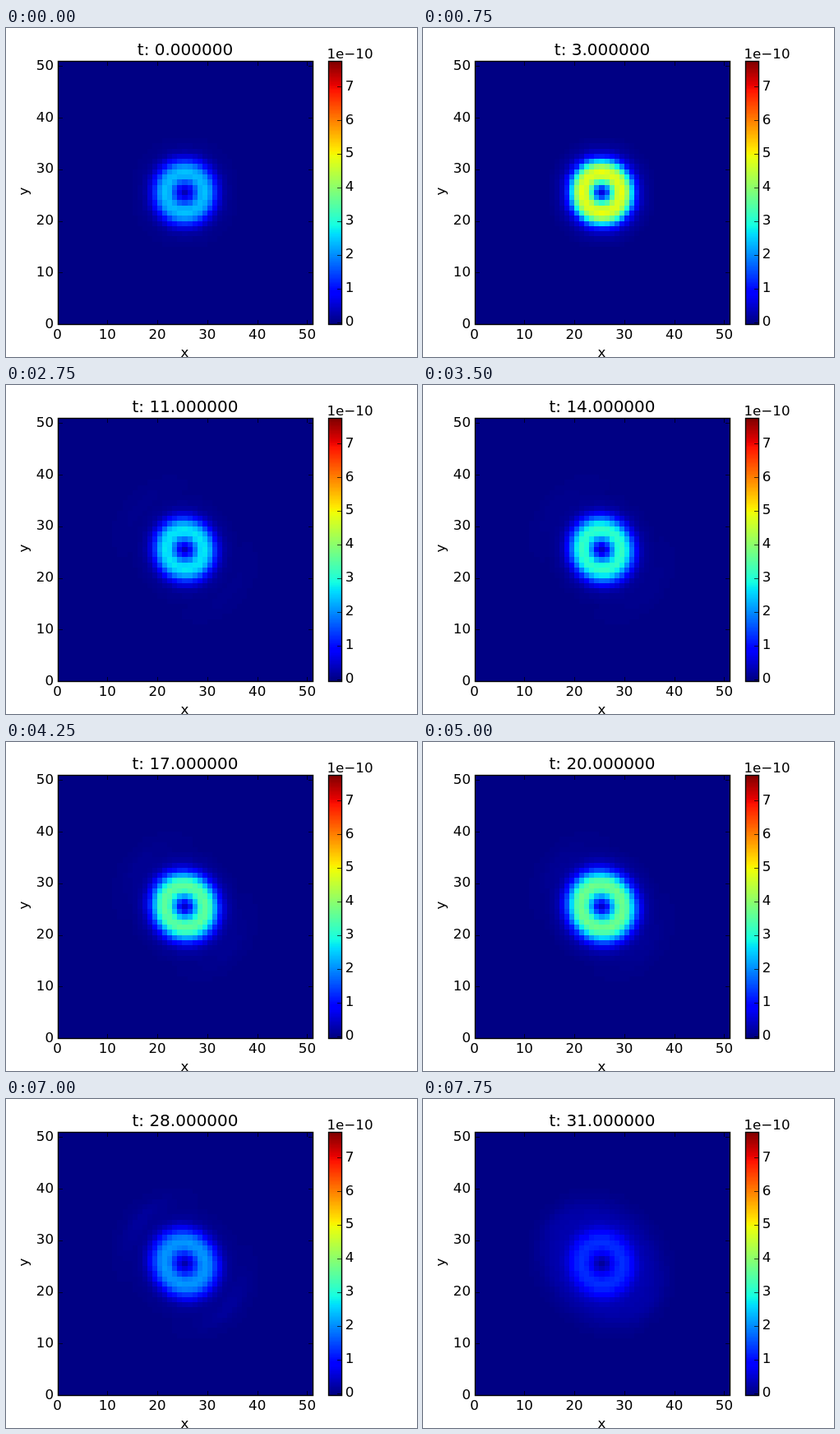
An HTML page with a canvas for the animation above (8 s loop, 500 by 400 pixels).

```html
<!DOCTYPE html>
<html lang="en">
<head>
<meta charset="utf-8">
<title>Ring field over time</title>
<style>
html, body { margin: 0; width: 100%; height: 100%; overflow: hidden; background: #fff; }
canvas, svg { position: absolute; left: 0; top: 0; }
text { font: 16.67px "DejaVu Sans", sans-serif; fill: #000; }
#title { font-size: 20px; }
.mid { text-anchor: middle; }
.end { text-anchor: end; }
path, rect { fill: none; stroke: #000; }
path { stroke-width: 0.7; }
rect { stroke-width: 1.39; }
</style>
</head>
<body>
<canvas id="field" width="500" height="400"></canvas>
<svg id="axes" width="500" height="400" viewBox="0 0 500 400">
  <path id="ticks"/>
  <rect x="63.5" y="40.5" width="310" height="320"/>
  <rect x="392.5" y="40.5" width="16" height="320"/>
  <text id="title" class="mid" x="218" y="33"></text>
  <text class="mid" x="217.5" y="400">x</text>
  <text class="mid" transform="translate(27 198.5) rotate(-90)">y</text>
  <text x="390.5" y="37">1e−10</text>
</svg>
<script>
const N = 51, LEFT = 62.5, TOP = 40, BOTTOM = 360, W = 310, H = 320;
const STEP = 250, STEPS = 32;
const VMIN = -0.058, VMAX = 7.757;

// Ring brightness by distance from the centre, in cells
const RING = [.13, .3, .63, .93, 1, .85, .53, .23, .08, .03, .012, 0];

// t, peak, size, tilt, wings, halo
const KEYS = [
  [0, 2.4, 1, 0, 0, 0],
  [3, 4.9, 1, .01, 0, 0],
  [5, 5.5, 1, .02, 0, 0],
  [6, 5.3, 1, .02, 0, 0],
  [11, 2.75, .97, .02, .05, 0],
  [17, 3.6, 1.05, .03, .08, 0],
  [20, 3.75, 1.09, .03, .08, 0],
  [23, 3.5, 1.13, .04, .09, 0],
  [28, 2.1, 1.06, .04, .15, 0],
  [31, 1.1, 1.03, .02, .04, .22]
];

const $ = id => document.getElementById(id);
const ctx = $('field').getContext('2d');
const mix = (a, b, k) => a + (b - a) * k;
const clamp = v => Math.max(0, Math.min(1, v));
const snap = v => Math.floor(v + 0.5) + 0.5;

function jet(u) {
  u = Math.min(255, Math.floor(clamp(u) * 256)) / 255;
  const r = u < .66 ? (u - .35) / .31 : u < .89 ? 1 : 1 - (u - .89) / .22;
  const g = u < .375 ? (u - .125) / .25 : u < .64 ? 1 : 1 - (u - .64) / .27;
  const b = u < .11 ? .5 + u / .22 : u < .34 ? 1 : 1 - (u - .34) / .31;
  return `rgb(${[r, g, b].map(c => Math.round(clamp(c) * 255))})`;
}

function stateAt(t) {
  const i = Math.max(1, KEYS.findIndex(k => k[0] >= t));
  const a = KEYS[i - 1], b = KEYS[i];
  const k = (t - a[0]) / (b[0] - a[0]);
  return a.map((v, j) => mix(v, b[j], k));
}

function ring(r) {
  const i = Math.floor(r);
  return i >= RING.length - 1 ? 0 : mix(RING[i], RING[i + 1], r - i);
}

function value(x, y, [, peak, size, tilt, wings, halo]) {
  const r = Math.hypot(x, y), angle = Math.atan2(y, x);
  const lobe = Math.cos(2 * (angle - 2.39));
  const body = peak * ring(r / (size * (1 + tilt * lobe)));
  const arc = wings * ((1 + lobe) / 2) ** 3 * Math.exp(-(((r - 12.3) / 1.7) ** 2));
  const edge = clamp((14.8 + 1.2 * lobe - r) / 6);
  const disc = edge * edge * (3 - 2 * edge) * (1 - Math.exp(-r * r / 10));
  return body + arc + halo * disc;
}

function drawField(t) {
  const state = stateAt(t), mid = (N - 1) / 2;
  const px = i => Math.round(LEFT + i * W / N);
  const py = j => Math.round(BOTTOM - j * H / N);
  for (let j = 0; j < N; j++) {
    for (let i = 0; i < N; i++) {
      const v = value(i - mid, j - mid, state);
      ctx.fillStyle = jet((v - VMIN) / (VMAX - VMIN));
      ctx.fillRect(px(i), py(j + 1), px(i + 1) - px(i), py(j) - py(j + 1));
    }
  }
}

function addText(x, y, text, cls) {
  const el = document.createElementNS('http://www.w3.org/2000/svg', 'text');
  el.setAttribute('x', x);
  el.setAttribute('y', Math.round(y));
  el.setAttribute('class', cls);
  el.textContent = text;
  $('axes').append(el);
}

function drawAxes() {
  let d = '';
  for (let n = 0; n <= 50; n += 10) {
    const x = LEFT + n * W / N, y = BOTTOM - n * H / N;
    d += `M${snap(x)} 360.5v-5.5M${snap(x)} 40.5v5.5`;
    d += `M63.5 ${snap(y)}h5.5M373.5 ${snap(y)}h-5.5`;
    addText(x, 378, n, 'mid');
    addText(58, y + 4.6, n, 'end');
  }
  for (let n = 0; n <= 7; n++) {
    const y = BOTTOM - (n - VMIN) / (VMAX - VMIN) * H;
    d += `M408.5 ${snap(y)}h-5.5`;
    addText(412.7, y + 4.6, n, '');
  }
  $('ticks').setAttribute('d', d);
  for (let y = 0; y < H; y++) {
    ctx.fillStyle = jet(1 - (y + .5) / H);
    ctx.fillRect(392, TOP + y, 16, 1);
  }
}

let shown = -1;
const start = performance.now();

function tick() {
  const t = Math.floor((performance.now() - start) / STEP) % STEPS;
  if (t !== shown) {
    shown = t;
    drawField(t);
    $('title').textContent = `t: ${t.toFixed(6)}`;
  }
  requestAnimationFrame(tick);
}

drawAxes();
tick();
</script>
</body>
</html>
```
